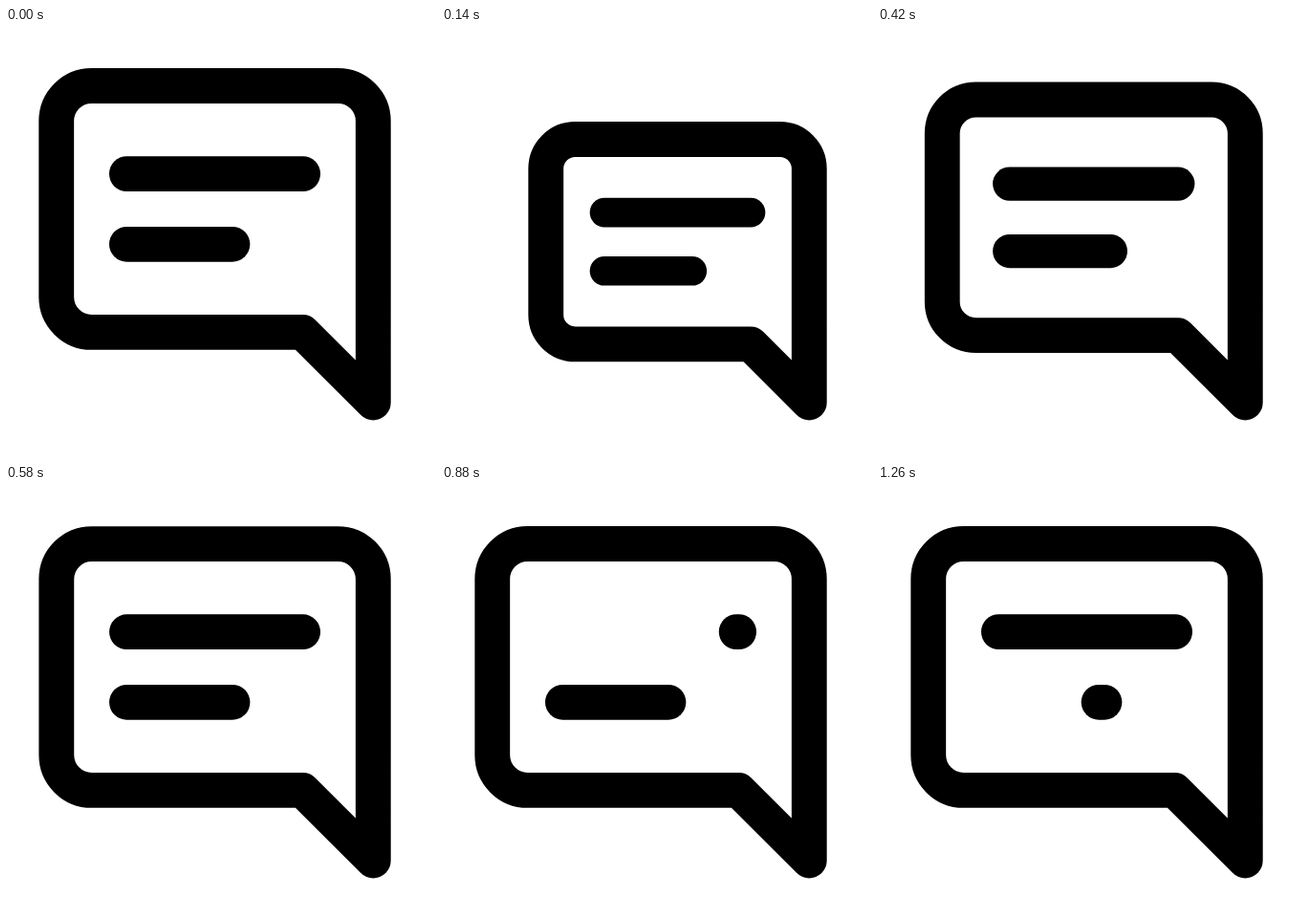
Animation of 450 by 450 pixels, one loop 1.28 s. Source, as an HTML page:

```html
<!DOCTYPE html>
<html lang="en">
<head>
<meta charset="utf-8">
<title>Chat bubble</title>
<style>
  html, body { margin: 0; width: 100%; height: 100%; overflow: hidden; background: #fff; }
  svg { display: block; width: 100vw; height: 100vh; }
</style>
</head>
<body>
<svg viewBox="0 0 450 450">
  <g transform="translate(-2.54 5.26) scale(18.42)" fill="none" stroke="#000" stroke-width="2"
     stroke-linecap="round" stroke-linejoin="round">
    <g id="icon">
      <path id="bubble" d="M3 5v10a2 2 0 0 0 2 2h12l4 4V5a2 2 0 0 0-2-2H5a2 2 0 0 0-2 2z"/>
      <path id="line1"/>
      <path id="line2"/>
    </g>
  </g>
</svg>
<script>
const LOOP = 1280, HALF = 300, WIPE = 280;
const [icon, bubble, line1, line2] =
  ['icon', 'bubble', 'line1', 'line2'].map(id => document.getElementById(id));

const progress = (t, start, length) => Math.min(1, Math.max(0, (t - start) / length));
const smooth = u => u * u * (3 - 2 * u);

// cubic-bezier(1/3, 0, 0, 1), solved by bisection
function snap(u) {
  let lo = 0, hi = 1;
  for (let i = 0; i < 30; i++) {
    const m = (lo + hi) / 2;
    if (m ** 3 + m * (1 - m) ** 2 < u) lo = m; else hi = m;
  }
  return smooth((lo + hi) / 2);
}

// Erases a line towards its right end, then draws it again from the left
function wipe(line, t, start, y, length) {
  const redraw = t >= start + WIPE;
  const p = smooth(progress(t, redraw ? start + WIPE : start, WIPE));
  const from = redraw ? 0 : p, to = redraw ? p : 1;
  line.setAttribute('d', from < to ? `M${7 + from * length} ${y}H${7 + to * length}` : '');
}

function draw(now) {
  const t = now % LOOP;
  const shrink = t < HALF ? snap(t / HALF) : 1 - snap(progress(t, HALF, HALF));
  const scale = 1 - 0.2 * shrink;
  icon.setAttribute('transform', `translate(21 21) scale(${scale}) translate(-21 -21)`);
  bubble.setAttribute('stroke-width', 2 / scale);
  wipe(line1, t, 620, 8, 10);
  wipe(line2, t, 1020, 12, 6);
}

const begin = performance.now();
function tick() {
  draw(performance.now() - begin);
  requestAnimationFrame(tick);
}
tick();
</script>
</body>
</html>
```
